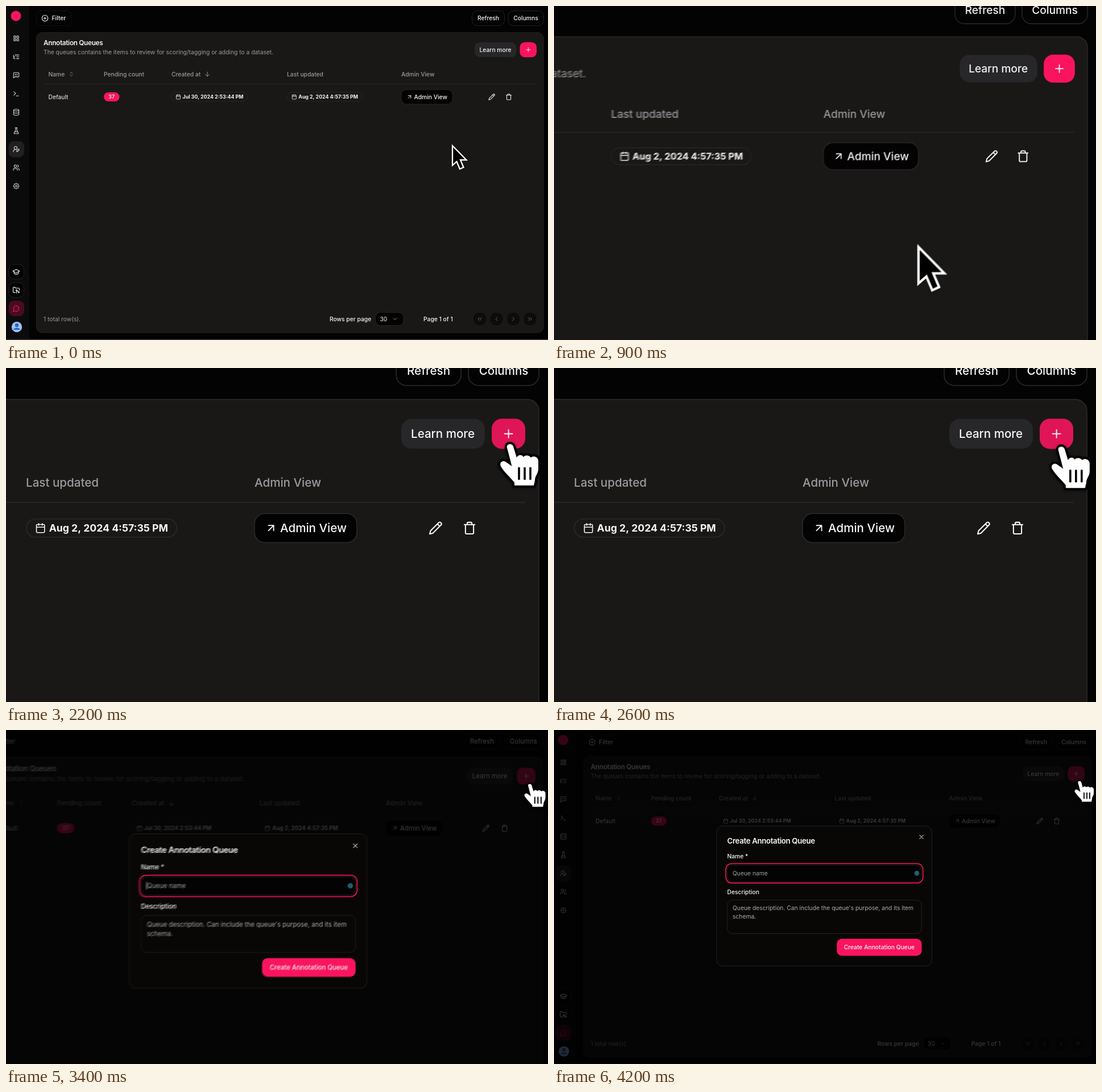
An HTML page with a canvas for the animation above (4.3 s loop, 953 by 588 pixels).

```html
<!DOCTYPE html>
<html lang="en">
<head>
<meta charset="utf-8">
<title>Annotation queues</title>
<style>
html, body { margin: 0; width: 100%; height: 100%; overflow: hidden; background: #040303; }
canvas { display: block; width: 953px; height: 588px; }
</style>
</head>
<body>
<canvas id="stage" width="953" height="588"></canvas>
<script>
const W = 953, H = 588, LOOP = 4300, STEP = 100;
const PINK = '#fa145f', WHITE = '#f7f7f7', MUTED = '#9c9a9d', EDGE = '#2b2929', INK = '#040303', PANEL = '#191817';
const SMALL = 8.82, BASE = 10.29;
const stage = document.getElementById('stage').getContext('2d');
const buffer = document.createElement('canvas');
buffer.width = W;
buffer.height = H;
const ctx = buffer.getContext('2d');

// Icons live on a 24-unit grid.
const ICONS = {
  grid: 'M4 4h6v6H4zM14 4h6v6h-6zM4 14h6v6H4zM14 14h6v6h-6z',
  tree: 'M21 12h-8M21 6H8M21 18h-8M3 6v4c0 1.1.9 2 2 2h3M3 10v6c0 1.1.9 2 2 2h3',
  code: 'M21 15a2 2 0 0 1-2 2H7l-4 4V5a2 2 0 0 1 2-2h14a2 2 0 0 1 2 2zM10 8l-2 2 2 2M14 8l2 2-2 2',
  terminal: 'M4 17l6-6-6-6M12 19h8',
  database: 'M3 5a9 3 0 0 0 18 0a9 3 0 0 0-18 0v14a9 3 0 0 0 18 0V5M3 12a9 3 0 0 0 18 0',
  flask: 'M8.500 2h7M10 2v8L4.500 20a1.500 1.500 0 0 0 1 2h13a1.500 1.500 0 0 0 1-2L14 10V2M7 16h10',
  userPen: 'M2 21a8 8 0 0 1 10.800-7.500M5 8a5 5 0 0 0 10 0a5 5 0 0 0-10 0M21.400 15.600a1 1 0 0 0-3-3l-4 4-1 4 4-1z',
  users: 'M16 21v-2a4 4 0 0 0-4-4H6a4 4 0 0 0-4 4v2M5 7a4 4 0 0 0 8 0a4 4 0 0 0-8 0M22 21v-2a4 4 0 0 0-3-3.900M16 3.100a4 4 0 0 1 0 7.800',
  gear: 'M4 12a8 8 0 0 0 16 0a8 8 0 0 0-16 0M9 12a3 3 0 0 0 6 0a3 3 0 0 0-6 0M12 2v2M12 20v2M2 12h2M20 12h2M5 5l1 1M18 18l1 1M5 19l1-1M18 6l1-1',
  cap: 'M12 4L1 9.500 12 15l11-5.500zM5 12v5c4 3 10 3 14 0v-5',
  folder: 'M9 20H4a2 2 0 0 1-2-2V5a2 2 0 0 1 2-2h4l2 3h10a2 2 0 0 1 2 2v5M11 13a2 2 0 0 0 4 0a2 2 0 0 0-4 0M13 15v7M18 19a2 2 0 0 0 4 0a2 2 0 0 0-4 0M20 17c-3 0-5-1-5-4',
  chat: 'M7.900 20A9 9 0 1 0 4 16.100L2 22zM8 12h.01M12 12h.01M16 12h.01',
  plusCircle: 'M2 12a10 10 0 0 0 20 0a10 10 0 0 0-20 0M8 12h8M12 8v8',
  pencil: 'M17 3a2.800 2.800 0 0 1 4 4L7.500 20.500 2 22l1.500-5.500zM15 5l4 4',
  trash: 'M3 6h18M19 6v14a2 2 0 0 1-2 2H7a2 2 0 0 1-2-2V6M8 6V4a2 2 0 0 1 2-2h4a2 2 0 0 1 2 2v2',
  calendar: 'M5 4h14a2 2 0 0 1 2 2v14a2 2 0 0 1-2 2H5a2 2 0 0 1-2-2V6a2 2 0 0 1 2-2zM16 2v4M8 2v4M3 10h18',
  plus: 'M5 12h14M12 5v14',
  close: 'M18 6L6 18M6 6l12 12',
  sort: 'M7 15l5 5 5-5M7 9l5-5 5 5',
  down: 'M12 4v16M5 13l7 7 7-7',
  open: 'M7 7h10v10M7 17L17 7',
  chevronDown: 'M6 9l6 6 6-6',
  first: 'M11 17l-5-5 5-5M18 17l-5-5 5-5',
  previous: 'M15 18l-6-6 6-6',
  next: 'M9 18l6-6-6-6',
  last: 'M6 17l5-5-5-5M13 17l5-5-5-5'
};
for (const name in ICONS) ICONS[name] = new Path2D(ICONS[name]);

const ARROW = new Path2D('M1 2V36.500L8.500 30L14 43L20.500 40L15 27H25.500Z');
const HAND = new Path2D('M-2.600 2C-3-1.500 2-2 3 1.200L6 11C7 8 11 8 11.800 10.500C13 8.500 17 8.500 18.500 11' +
  'C20 9 24.500 10 25 13.500V21C25 25 22 27 22 31L21 35.500H4V33C1 29-4 25-7.500 19.500C-10 16-7 13-4 14.500L1.700 18.500Z');
const HAND_LINES = new Path2D('M8 19.500V30.500M13 19.500V30.500M18 19.500V30.500');

const clamp = v => Math.min(1, Math.max(0, v));
const smooth = (t, from, to) => { const p = clamp((t - from) / (to - from)); return p * p * (3 - 2 * p); };
const mix = (a, b, p) => a + (b - a) * p;
const spring = (t, start) => { const x = Math.max(0, t - start) * 0.0061; return 1 - (1 + x) * Math.exp(-x); };

const zoomAt = t => 1 + spring(t, 336) - spring(t, 2773);
function pointerAt(t) {
  const drift = smooth(t, 2300, 2800);
  return {
    x: mix(784, 919.5, smooth(t, 1100, 2000)) + 4.5 * drift,
    y: mix(244, 87, smooth(t, 1300, 2150)) + 3.5 * drift,
    hand: t > 2060
  };
}

function text(str, x, mid, { size = BASE, weight = 400, color = WHITE, align = 'left', spacing = 0 } = {}) {
  ctx.font = `${weight} ${size}px Inter, sans-serif`;
  ctx.letterSpacing = spacing * size + 'px';
  ctx.textAlign = align;
  ctx.fillStyle = color;
  ctx.fillText(str, x, mid + size * 0.36);
}

function box(x1, y1, x2, y2, r, fill, stroke, width = 0.8) {
  ctx.beginPath();
  ctx.roundRect(x1, y1, x2 - x1, y2 - y1, r);
  if (fill) { ctx.fillStyle = fill; ctx.fill(); }
  if (stroke) { ctx.strokeStyle = stroke; ctx.lineWidth = width; ctx.stroke(); }
}

function disc(x, y, r, fill) {
  ctx.beginPath();
  ctx.arc(x, y, r, 0, 7);
  ctx.fillStyle = fill;
  ctx.fill();
}

function icon(name, x, y, size = 12, color = WHITE, width = 2) {
  ctx.save();
  ctx.translate(x, y);
  ctx.scale(size / 24, size / 24);
  ctx.translate(-12, -12);
  ctx.strokeStyle = color;
  ctx.lineWidth = width;
  ctx.lineCap = ctx.lineJoin = 'round';
  ctx.stroke(ICONS[name]);
  ctx.restore();
}

function sidebar() {
  ctx.fillStyle = '#0c0b0b';
  ctx.fillRect(0, 0, 41, H);
  disc(17.5, 17.5, 9, PINK);
  box(4.5, 238, 32, 266.500, 9, '#211f1f');
  ['grid', 'tree', 'code', 'terminal', 'database', 'flask', 'userPen', 'users', 'gear']
    .forEach((name, i) => icon(name, 18, 57 + i * 32.500, 12.500, '#dedede'));
  box(5, 455, 31.500, 481, 9, INK, EDGE);
  box(5, 487, 31.500, 513, 9, INK, EDGE);
  box(4.5, 519, 32, 546, 9, '#480c20');
  icon('cap', 18, 468, 13);
  icon('folder', 18, 500, 13);
  icon('chat', 18, 532.500, 13, PINK);
  disc(19, 565, 9.2, '#9dc1f6');
  disc(19, 562, 3.2, '#2f62bd');
  ctx.beginPath();
  ctx.ellipse(19, 570, 5.8, 3.4, 0, Math.PI, 0);
  ctx.fill();
}

function dateBadge(x, right, label) {
  box(x, 152, right, 168, 8, null, '#2a2828');
  icon('calendar', x + 12.500, 160, 9.5);
  text(label, x + 20, 160, { size: SMALL, weight: 700 });
}

function page(hover) {
  ctx.fillStyle = INK;
  ctx.fillRect(0, 0, W, H);
  sidebar();

  ctx.setLineDash([2, 2]);
  box(53.500, 8.500, 115, 34.500, 9, null, EDGE);
  ctx.setLineDash([]);
  icon('plusCircle', 68.500, 21.500, 12.500);
  const strong = { weight: 500 }, centered = { weight: 500, align: 'center' };
  text('Filter', 80.500, 21.500, strong);
  box(819.500, 8.500, 876.500, 34.500, 9, null, EDGE);
  text('Refresh', 848, 21.500, centered);
  box(883, 8.500, 945, 34.500, 9, null, EDGE);
  text('Columns', 914, 21.500, centered);

  box(53.500, 46.800, 945, 575, 10, PANEL, EDGE);
  text('Annotation Queues', 66, 65, { size: 11.76, weight: 600, spacing: -0.025 });
  text('The queues contains the items to review for scoring/tagging or adding to a dataset.', 66, 81.500, { color: MUTED });
  box(824, 64, 897.500, 90, 9, '#27272a');
  text('Learn more', 860.500, 77, centered);
  box(903.500, 63.700, 933, 90.300, 9, hover ? '#e01557' : PINK);
  icon('plus', 918.300, 77, 12, WHITE, 1.9);

  const head = { weight: 500, color: MUTED };
  text('Name', 74.500, 120, head);
  icon('sort', 115, 120, 9.5, MUTED);
  text('Pending count', 172, 120, head);
  text('Created at', 291, 120, head);
  icon('down', 354, 120, 11.500, MUTED);
  text('Last updated', 494, 120, head);
  text('Admin View', 695, 120, head);
  ctx.fillStyle = EDGE;
  ctx.fillRect(66, 137, 867, 0.8);

  text('Default', 74.500, 160);
  box(172, 152, 199.500, 168, 8, PINK);
  text('37', 185.700, 160, { size: SMALL, weight: 600, align: 'center' });
  dateBadge(290.500, 425, 'Jul 30, 2024 2:53:44 PM');
  dateBadge(494.300, 626.500, 'Aug 2, 2024 4:57:35 PM');
  box(695, 147.200, 785, 172.800, 9, INK, EDGE);
  icon('open', 709.500, 160, 11);
  text('Admin View', 717.500, 160, strong);
  icon('pencil', 854.200, 160, 12.500);
  icon('trash', 884, 160, 12.200);

  text('1 total row(s).', 66, 551, { color: MUTED });
  text('Rows per page', 569, 551, strong);
  box(649.500, 539.500, 699, 562.500, 9, INK, EDGE);
  text('30', 657.500, 551);
  icon('chevronDown', 684, 551, 11, MUTED);
  text('Page 1 of 1', 734, 551, strong);
  ['first', 'previous', 'next', 'last'].forEach((name, i) => {
    const x = 833 + i * 29.500;
    box(x - 11, 540, x + 11, 562, 9, '#0d0c0c');
    icon(name, x, 551, 12, '#68666a');
  });
  ctx.fillStyle = '#343236';
  ctx.fillRect(0, 586.500, W, 1.5);
}

function dialog(open, caret) {
  ctx.globalAlpha = open;
  ctx.fillStyle = 'rgba(0, 0, 0, 0.78)';
  ctx.fillRect(0, 0, W, H);
  ctx.translate(476, 292);
  ctx.scale(mix(0.95, 1, open), mix(0.95, 1, open));
  ctx.translate(-476, -292);

  box(287, 169, 664.800, 415, 10, '#080706', EDGE);
  text('Create Annotation Queue', 305.500, 194.500, { size: 13.23, weight: 600, spacing: -0.025 });
  icon('close', 646.500, 188, 12.500, '#c8c8c8');
  text('Name *', 305.500, 222, { weight: 500 });
  box(303.200, 235, 649.200, 269, 10, INK, PINK, 1.6);
  box(305.700, 237.500, 646.700, 266.500, 8.5, null, EDGE);
  text('Queue name', 315, 251.700, { color: '#a3a1a4' });
  if (caret) {
    ctx.fillStyle = WHITE;
    ctx.fillRect(314.200, 245.500, 0.8, 12);
  }
  disc(638.500, 251.800, 4.3, '#245c70');
  text('Description', 305.500, 284.500, { weight: 500 });
  box(305.700, 299, 646.700, 358, 9, null, EDGE);
  text("Queue description. Can include the queue's purpose, and its item", 315, 313.300, { color: '#adabae' });
  text('schema.', 315, 328, { color: '#adabae' });
  box(498, 367, 647, 396.800, 9, PINK);
  text('Create Annotation Queue', 572.500, 381.800, { weight: 500, align: 'center' });
}

function pointer({ x, y, hand }) {
  ctx.translate(x, y);
  ctx.lineJoin = hand ? 'round' : 'miter';
  ctx.strokeStyle = hand ? '#000' : '#fff';
  ctx.fillStyle = hand ? '#fff' : '#000';
  ctx.lineWidth = hand ? 4 : 2.3;
  ctx.shadowColor = 'rgba(0, 0, 0, 0.5)';
  ctx.shadowBlur = 4;
  ctx.shadowOffsetY = 1.5;
  const shape = hand ? HAND : ARROW;
  if (hand) ctx.stroke(shape);
  else ctx.fill(shape);
  ctx.shadowColor = 'transparent';
  if (hand) ctx.fill(shape);
  else ctx.stroke(shape);
  if (hand) {
    ctx.lineWidth = 1.8;
    ctx.stroke(HAND_LINES);
  }
}

function scene(t, caret) {
  const zoom = zoomAt(t), cursor = pointerAt(t), open = smooth(t, 2600, 2800);
  ctx.setTransform(zoom, 0, 0, zoom, W * (1 - zoom), 38.2 * (1 - zoom));
  page(cursor.hand);
  if (open > 0) {
    ctx.save();
    dialog(open, caret);
    ctx.restore();
  }
  ctx.save();
  pointer(cursor);
  ctx.restore();
}

// Averages moments around t to give the camera a short shutter blur.
function render(t) {
  const caret = (t + 750) % 1000 < 500;
  const a = pointerAt(t - 6), b = pointerAt(t + 6);
  const still = Math.abs(zoomAt(t + 6) - zoomAt(t - 6)) < 0.0005 && Math.hypot(a.x - b.x, a.y - b.y) < 0.2;
  const samples = still ? 1 : 7;
  for (let i = 0; i < samples; i++) {
    scene(t + (i - (samples - 1) / 2) * 2, caret);
    stage.globalAlpha = 1 / (i + 1);
    stage.drawImage(buffer, 0, 0);
  }
}

let shown = -1;
function tick() {
  const t = Math.floor(((performance.now() + 1) % LOOP) / STEP) * STEP;
  if (t !== shown) render(shown = t);
  requestAnimationFrame(tick);
}
tick();
</script>
</body>
</html>
```
